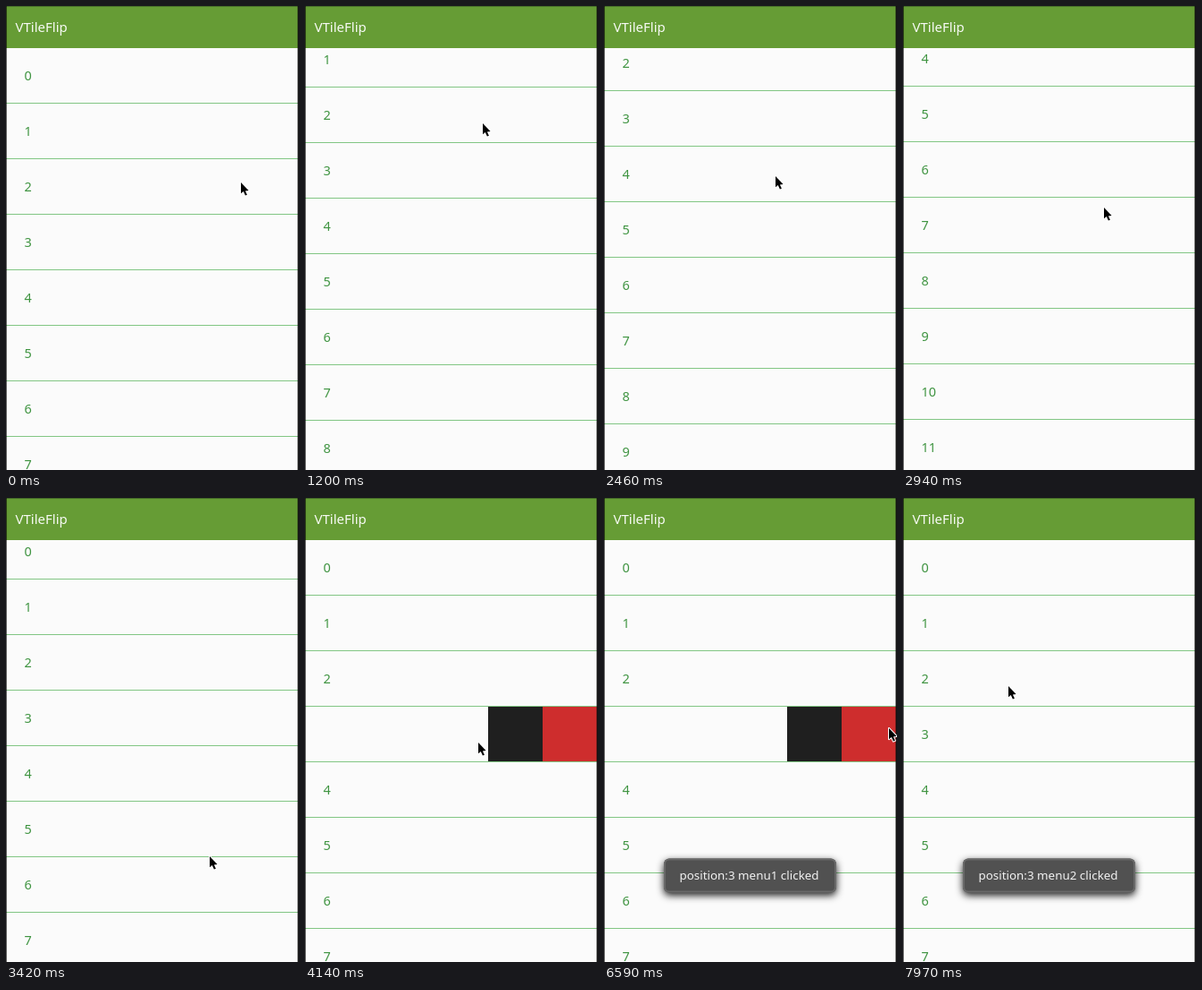
An HTML page with a canvas for the animation above (8000 ms loop, 328 px wide and 518 px high).

```html
<!DOCTYPE html>
<html lang="en">
<head>
<meta charset="utf-8">
<title>Swipe list</title>
<style>
html, body { margin: 0; width: 100%; height: 100%; overflow: hidden; background: #fbfbfb; }
canvas { display: block; width: 328px; height: 518px; }
</style>
</head>
<body>
<canvas id="stage" width="328" height="518"></canvas>
<script>
const W = 328, H = 518, LOOP = 8000, STEP = 60;
const HEAD = 47, ROW = 62, MENU = 123;
const FONT = '"Noto Sans", "Open Sans", sans-serif';
const ctx = document.getElementById('stage').getContext('2d');

// The pointer rests at each stop, then glides to arrive at the next on time
const GLIDE = 300;
const stops = [
  [0, 263, 197], [360, 142, 205], [660, 200, 327], [1200, 199, 131],
  [2100, 188, 312], [2460, 192, 190], [2940, 225, 225], [3240, 228, 400],
  [3720, 317, 270], [4140, 194, 273], [4260, 231, 272], [5470, 319, 257],
  [7330, 58, 283], [7630, 116, 288], [7910, 118, 210]
];

function ease(t, start, end) {
  const u = Math.min(1, Math.max(0, (t - start) / (end - start)));
  return u * u * (3 - 2 * u);
}

// Rises from a to b, falls back from c to d
const pulse = (t, a, b, c, d) => ease(t, a, b) - ease(t, c, d);

const scroll = t =>
  160 * pulse(t, 900, 1500, 1800, 2160) + 276 * pulse(t, 2220, 2700, 2870, 3520);

function swipe(row, t) {
  if (row === 2) return MENU * pulse(t, 60, 420, 660, 840);
  if (row === 3) return MENU * pulse(t, 3780, 4110, 7330, 7790);
  return 0;
}

function pointerAt(t) {
  let [, x, y] = stops[0];
  for (let i = 1; i < stops.length; i++) {
    const [end, toX, toY] = stops[i];
    const k = ease(t, Math.max(stops[i - 1][0], end - GLIDE), end);
    x += (toX - x) * k;
    y += (toY - y) * k;
  }
  return [x, y];
}

function rect(x, y, w, h, color) {
  ctx.fillStyle = color;
  ctx.fillRect(x, y, w, h);
}

function label(text, x, y, size, color) {
  ctx.font = `${size}px ${FONT}`;
  ctx.fillStyle = color;
  ctx.fillText(text, x, y);
}

function drawList(t) {
  const offset = scroll(t);
  for (let i = Math.floor(offset / ROW); ; i++) {
    const y = Math.round(HEAD + i * ROW - offset);
    if (y >= H) break;
    const shift = swipe(i, t);
    label(String(i), 20.5 - shift, y + 36, 14.5, '#3f9441');
    if (shift > 0) {
      const x = W - shift;
      rect(x, y, MENU / 2, ROW, '#1f1f1f');
      rect(x + 61, y, MENU / 2 + 1, ROW, '#ce2d2d');
    }
    rect(0, y + ROW - 1, W, 1, '#82c684');
  }
}

function drawHeader() {
  rect(0, 0, W, HEAD, '#669c35');
  rect(0, 0, W, 1, '#48702a');
  label('VTileFlip', 10.5, 29, 15, '#f7faf4');
}

function drawToast(text, alpha) {
  if (alpha <= 0) return;
  ctx.save();
  ctx.globalAlpha = alpha;
  ctx.beginPath();
  ctx.roundRect(67, 402.5, 193, 38, 6);
  ctx.shadowColor = 'rgba(0,0,0,.9)';
  ctx.shadowBlur = 9;
  ctx.shadowOffsetY = 3;
  ctx.fillStyle = '#515151';
  ctx.fill();
  ctx.shadowColor = 'transparent';
  ctx.beginPath();
  ctx.roundRect(68, 403.5, 191, 36, 5);
  ctx.strokeStyle = '#696969';
  ctx.lineWidth = 2;
  ctx.stroke();
  label(text, 84.5, 426, 13.4, '#f2f2f2');
  ctx.restore();
}

function drawPointer(x, y) {
  ctx.save();
  ctx.translate(x, y);
  ctx.beginPath();
  [[0, 0], [0, 12.3], [2.8, 10], [4.9, 14.6], [6.9, 13.8], [4.9, 9.4], [8.6, 9]]
    .forEach(p => ctx.lineTo(...p));
  ctx.closePath();
  ctx.lineJoin = 'round';
  ctx.lineWidth = 2;
  ctx.strokeStyle = '#fff';
  ctx.stroke();
  ctx.fillStyle = '#000';
  ctx.fill();
  ctx.restore();
}

function draw(t) {
  rect(0, 0, W, H, '#fbfbfb');
  drawList(t);
  drawHeader();
  rect(0, 0, 1, H, 'rgba(0,0,0,.6)');
  rect(W - 1.5, 0, 1.5, H, '#111');
  const swap = ease(t, 6590, 6890);
  drawToast('position:3 menu1 clicked', ease(t, 4560, 4860) * (1 - swap));
  drawToast('position:3 menu2 clicked', swap);
  drawPointer(...pointerAt(t));
}

const begin = performance.now();
function frame() {
  const t = (performance.now() - begin) % LOOP;
  draw(Math.floor(t / STEP) * STEP);
  requestAnimationFrame(frame);
}
frame();
</script>
</body>
</html>
```
